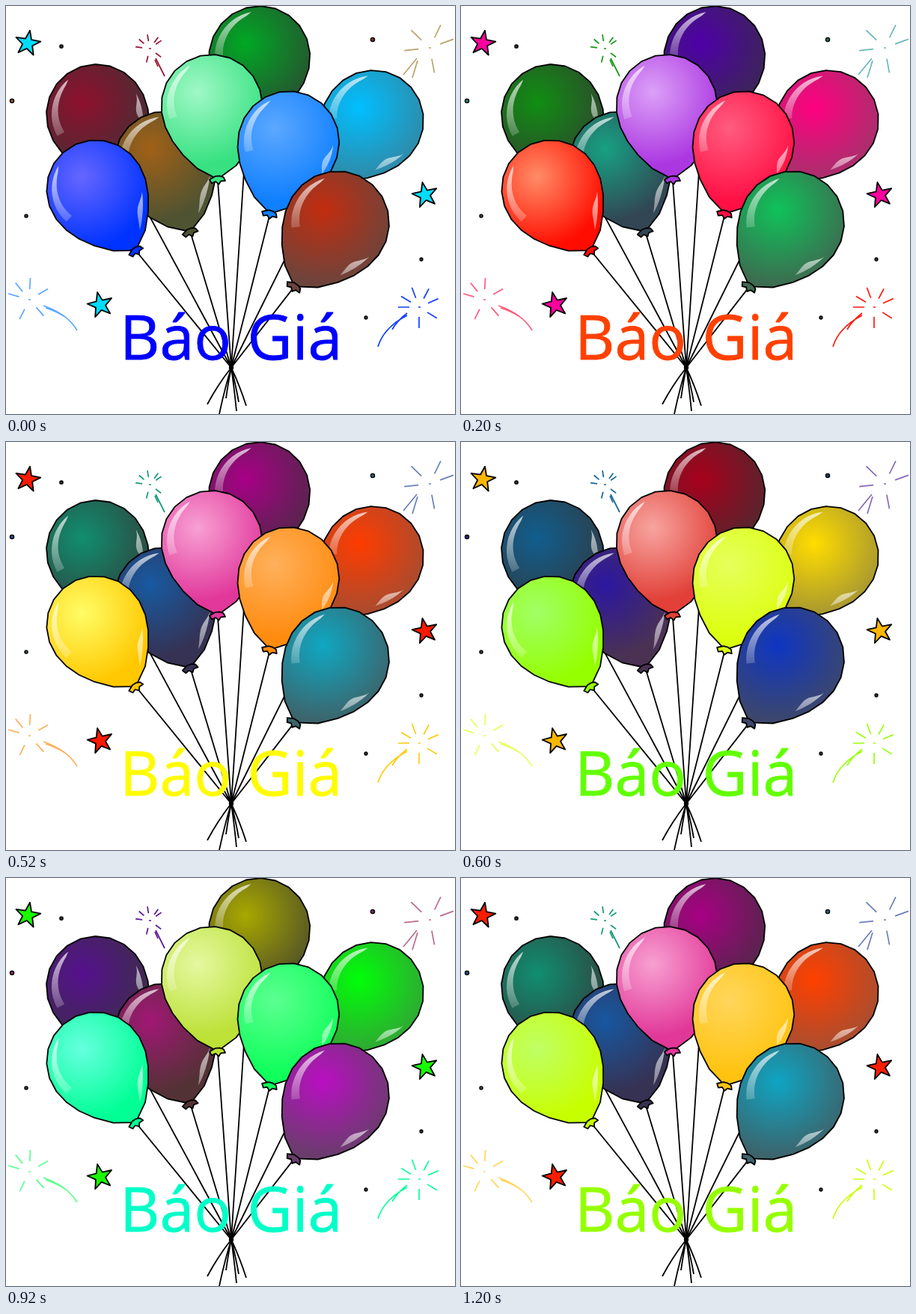
Recreate the animation shown at these times as an HTML page. Size 600x546 px, loop 1.4 s.

```html
<!DOCTYPE html>
<html lang="vi">
<head>
<meta charset="utf-8">
<title>Báo Giá</title>
<style>
  html, body { margin: 0; width: 100%; height: 100%; overflow: hidden; background: #fff; }
  svg { display: block; width: 100%; height: 100%; }
  path, polygon { stroke-linejoin: round; }
  .line { fill: none; stroke: #000; stroke-width: 1.8; }
  .skin { stroke: #000; stroke-width: 1.8; }
  .spark { fill: none; stroke-width: 1.7; }
  text { font: 82.5px "Open Sans", "Noto Sans", sans-serif; stroke-width: .8; }
</style>
</head>
<body>
<svg id="stage" viewBox="0 0 600 546">
  <defs>
    <linearGradient id="shine" x1="0" y1="0" x2="0" y2="1">
      <stop offset="0" stop-color="#fff" stop-opacity=".72"/>
      <stop offset="1" stop-color="#fff" stop-opacity=".2"/>
    </linearGradient>
    <linearGradient id="gleam" x1="0" y1="0" x2="0" y2="1">
      <stop offset="0" stop-color="#fff" stop-opacity=".65"/>
      <stop offset="1" stop-color="#fff" stop-opacity=".4"/>
    </linearGradient>
  </defs>
</svg>
<script>
const STEP = 200;
const TURNS = [0, 135, 179, 217, 287, 348, 180]; // hue rotation of the whole picture per step
const TIE = [301, 484];
const stage = document.getElementById('stage');
const rad = deg => deg * Math.PI / 180;

// Point at a clockwise angle from straight up
const polar = (r, deg) => [r * Math.sin(rad(deg)), -r * Math.cos(rad(deg))].map(v => +v.toFixed(1));

// drift: extra hue on the last step
const color = (hue, s, l, drift = 0) =>
  `hsl(calc(${hue} + var(--turn) + ${drift} * var(--late)), ${s}%, ${l}%)`;

// tilt turns the tip clockwise from straight down; lit and shade are where the highlights begin;
// inner and edge are [saturation, lightness, hue shift]
const balloons = [
  { x: 121, y: 145, tilt: -27, hue: 346, inner: [80, 31], edge: [22, 23], lit: -39, shade: 62 },
  { x: 212, y: 208, tilt: -20, hue: 32, inner: [75, 36], edge: [25, 26, 36], lit: -7, shade: 107 },
  { x: 339, y: 67, tilt: 10, hue: 133, inner: [100, 33], edge: [38, 24], lit: -11 },
  { x: 275, y: 132, tilt: -4.5, hue: 146, inner: [86, 80], edge: [74, 55], lit: -29 },
  { x: 491, y: 153, tilt: 40, hue: 195, inner: [100, 50], edge: [54, 42], lit: -7, shade: 138 },
  { x: 378, y: 181, tilt: 14.6, hue: 212, drift: 13, inner: [100, 68], edge: [100, 53], lit: -24, shade: 95 },
  { x: 443, y: 290, tilt: 34, size: 1.03, hue: 10, inner: [86, 41], edge: [28, 33], lit: -16, shade: 137 },
  { x: 120, y: 245, tilt: -33, size: .98, hue: 240, drift: 25, inner: [100, 70], edge: [100, 50, -12], lit: -58, shade: 93 }
];

// Round body drawn out to a tip; off is the angle away from the tip
const radius = off => 67 + 33 * Math.exp(-((Math.abs(off) / 31) ** 1.3));
const tipOf = ({ x, y, tilt, size = 1 }) => {
  const [dx, dy] = polar(100 * size, 180 + tilt);
  return [x + dx, y + dy];
};

// Band between two radius curves over a sweep of angles
function band(start, sweep, outer, inner) {
  const ts = Array.from({ length: 13 }, (_, i) => i / 12);
  const side = r => ts.map(t => polar(r(t, start + sweep * t), start + sweep * t));
  return [...side(outer), ...side(inner).reverse()].join(' ');
}

function drawBalloon(b, i) {
  const { x, y, tilt, size = 1, hue, drift, inner, edge, lit, shade } = b;
  const shaded = ([s, l, shift = 0]) => color(hue + shift, s, l, drift);
  const body = Array.from({ length: 21 }, (_, k) => {
    const off = k * 360 / 21 - (k > 10 ? 360 : 0);
    return polar(radius(off), 180 + tilt + off);
  });
  const crescent = band(lit, -80, () => 60, t => 60 - 11 * Math.sqrt(t));
  const rim = a => radius((a - 180 - tilt + 540) % 360 - 180) - 8;
  const streak = shade && band(shade, 40,
    (t, a) => rim(a), (t, a) => rim(a) - 8 * Math.sin(Math.PI * t ** 1.4));
  return `<radialGradient id="b${i}" gradientUnits="userSpaceOnUse" cx="-19" cy="-17" r="98">
      <stop offset="0" style="stop-color:${shaded(inner)}"/>
      <stop offset="1" style="stop-color:${shaded(edge)}"/>
    </radialGradient>
    <g transform="translate(${x} ${y}) scale(${size})">
      <polygon class="skin" points="${body.join(' ')}" fill="url(#b${i})"/>
      <path class="skin" d="M-3-4L-11,0-8,5-3,3 1,7 4,3 10,3 8-2 3-4Z"
        transform="rotate(${tilt}) translate(0 100)" style="fill:${shaded(edge)}"/>
      <polygon points="${crescent}" fill="url(#shine)"/>
      ${streak ? `<polygon points="${streak}" fill="url(#gleam)"/>` : ''}
    </g>`;
}

function drawStar(x, y, tilt) {
  const points = Array.from({ length: 10 }, (_, i) => polar(i % 2 ? 7 : 17.5, i * 36 + tilt));
  return `<polygon class="skin" points="${points.join(' ')}" transform="translate(${x} ${y})"
    style="fill:${color(187, 100, 49)}"/>`;
}

const drawDot = (x, y, r, fill = '#333') =>
  `<circle cx="${x}" cy="${y}" r="${r}" stroke="#000" stroke-width="1.3" style="fill:${fill}"/>`;

// Rays around a centre, with a trail given relative to it
function drawBurst(x, y, near, far, angles, trail, stroke) {
  const rays = angles.map(a => `M${polar(near, a)}L${polar(far, a)}`).join('');
  return `<path class="spark" d="${rays}M-1,0H2${trail}" transform="translate(${x} ${y})" style="stroke:${stroke}"/>`;
}

const strings = balloons.map(b => `M${tipOf(b)}L${TIE}`).join('');
const tails = [[-32, 49], [-16, 62], [-7, 41], [7, 58], [10, 46], [20, 51]]
  .map(([dx, dy]) => `M${TIE}q${dx * .55},${dy * .45} ${dx},${dy}`).join('');
const blue = color(240, 100, 50, 25);

stage.innerHTML += [
  `<path class="line" d="${strings}${tails}"/><circle cx="301" cy="484" r="3.2"/>`,
  ...balloons.map(drawBalloon),
  drawStar(29, 50, 10), drawStar(560, 253, -12), drawStar(126, 400, -13),
  drawDot(74, 54, 2.2), drawDot(555, 339, 2), drawDot(481, 417, 2),
  drawDot(490, 45, 2.6, color(10, 50, 30)),
  drawDot(8, 127, 2.6, color(32, 60, 32)),
  drawDot(27, 281, 2.1, color(346, 25, 25)),
  drawBurst(192, 57, 10, 19, [-83, -49, -9, 37, 55, 127, 193],
    'M8,13L20,37M7,15L11,24', color(346, 75, 34)),
  drawBurst(566, 56, 15, 34, [-134, -96, -46, 26, 70, 169][0] ? [-96, -46, 26, 70, 169] : [],
    'M-17,14L-35,36M-16,17L-23,40', color(44, 36, 57)),
  drawBurst(31, 393, 14, 29, [-74, -39, 3, 60, 138, 206],
    'M19,8Q51,19 64,41M22,11Q37,16 46,22', color(212, 100, 68, 13)),
  drawBurst(552, 403, 13, 28, [-90, -59, -20, 28, 66, 122, 180],
    'M-16,11Q-47,27-55,53M-36,30Q-30,19-16,8', color(228, 100, 53, 25)),
  `<text x="152" y="473" style="fill:${blue};stroke:${blue}">Báo Giá</text>`
].join('');

function tick(now) {
  const step = Math.floor(now / STEP) % TURNS.length;
  stage.style.setProperty('--turn', TURNS[step]);
  stage.style.setProperty('--late', +(step === TURNS.length - 1));
  requestAnimationFrame(tick);
}
tick(performance.now());
</script>
</body>
</html>
```
